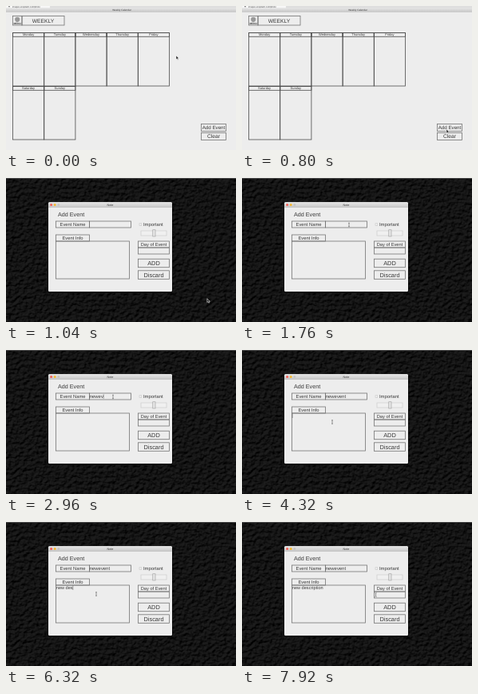
An HTML page that plays this animation: 288 px wide and 180 px high, repeating every 8000 ms.

```html
<!DOCTYPE html>
<html lang="en">
<head>
<meta charset="utf-8">
<title>Weekly planner</title>
<style>
  html, body { margin: 0; width: 100%; height: 100%; overflow: hidden; background: #111; }
  svg { display: block; width: 100vw; height: 100vh; }
  text { font-family: "Liberation Sans", Arial, sans-serif; fill: #383838; text-rendering: geometricPrecision; }
  .box { fill: none; stroke: #747474; stroke-width: .8; }
  .grid { fill: none; stroke: #4c4c4c; stroke-width: .8; }
  .faint { fill: #f0f0f0; stroke: #c6c6c6; stroke-width: .6; }
</style>
</head>
<body>
<svg id="stage" viewBox="0 0 288 180" preserveAspectRatio="none">
  <defs>
    <filter id="leather" x="0" y="0" width="100%" height="100%" color-interpolation-filters="sRGB">
      <feTurbulence type="fractalNoise" baseFrequency=".2 .24" numOctaves="3" seed="8"/>
      <feDiffuseLighting surfaceScale="3.2" lighting-color="#1d1d1d">
        <feDistantLight azimuth="235" elevation="48"/>
      </feDiffuseLighting>
    </filter>
    <linearGradient id="bar" x2="0" y2="1">
      <stop stop-color="#e6e6e6"/><stop offset="1" stop-color="#c8c8c8"/>
    </linearGradient>
    <linearGradient id="shade" x2="1" y2="1">
      <stop stop-color="#000" stop-opacity=".45"/><stop offset="1" stop-color="#000" stop-opacity="0"/>
    </linearGradient>
  </defs>
  <g id="calendar"></g>
  <g id="browser"></g>
  <g id="form"></g>
  <g id="pointer">
    <path id="arrow" d="M0 0V4.8L1.2 3.8 2 5.5 2.9 5.1 2.1 3.5H3.6Z" fill="#222" stroke="#fff" stroke-width=".5"/>
    <path id="beam" d="M-1-2.4Q0-2.4 0-1.7Q0-2.4 1-2.4M0-1.7V1.7M-1 2.4Q0 2.4 0 1.7Q0 2.4 1 2.4" fill="none" stroke="#555" stroke-width=".6"/>
  </g>
</svg>
<script>
const LOOP = 8000;
const OPEN = 880, FILLED = 960;
const $ = id => document.getElementById(id);

const rect = (x, y, w, h, attrs = 'class="box"') =>
  `<rect x="${x}" y="${y}" width="${w}" height="${h}" ${attrs}/>`;
const label = (x, y, size, text, anchor = 'middle', attrs = '') =>
  `<text x="${x}" y="${y}" font-size="${size}" text-anchor="${anchor}" ${attrs}>${text}</text>`;
const button = (x, y, w, h, size, text) =>
  rect(x, y, w, h) + label(x + w / 2, y + h / 2 + size * .36, size, text);
const dot = (x, y, r, color) => `<circle cx="${x}" cy="${y}" r="${r}" fill="${color}"/>`;
const leather = rect(0, 0, 288, 180, 'filter="url(#leather)"');

function appWindow(x, y, w, h) {
  const lights = ['#f25f57', '#f5b82e', '#c4c4c4']
    .map((color, i) => dot(x + 3.6 + i * 4.6, y + 3.2, 1.5, color)).join('');
  return rect(x - 1, y, w + 2, h + 2, 'rx="2" fill="#000" opacity=".5"') +
    rect(x, y, w, h, 'rx="1.5" fill="#ededed"') +
    rect(x, y, w, 6.3, 'rx="1.5" fill="url(#bar)"') +
    rect(x, y + 6, w, .5, 'fill="#aaa"') +
    lights + label(x + w / 2, y + 4.5, 3.7, 'Note');
}

function dayCell(name, i) {
  const x = 8.5 + (i % 5) * 39.2, y = i < 5 ? 33.5 : 100.5;
  return rect(x, y, 39.2, 66.5, 'class="grid"') +
    rect(x, y, 39.2, 4.8, 'class="grid"') + label(x + 19.6, y + 3.8, 4, name);
}

const days = ['Monday', 'Tuesday', 'Wednesday', 'Thursday', 'Friday', 'Saturday', 'Sunday'];
$('calendar').innerHTML =
  rect(0, 0, 288, 180, 'fill="#ededed"') +
  rect(0, 0, 288, 3, 'fill="#dedede"') +
  rect(0, 0, 55, 2.4, 'fill="#f7f7f7"') +
  label(8, 1.5, 2.8, 'images.unsplash.com/photo', 'start') + dot(4, .6, .9, '#777') +
  rect(0, 2.6, 288, 4.6, 'fill="url(#bar)"') + rect(0, 7, 288, .5, 'fill="#b5b5b5"') +
  label(145, 6.1, 3.1, 'Weekly Calendar') +
  rect(8.5, 12.5, 11.5, 11.5) + dot(14.2, 16.8, 3.1, '#999') +
  label(14.2, 23.3, 3.2, 'MENU', 'middle', 'font-weight="bold"') +
  button(20, 12.5, 53, 11.5, 6.7, 'WEEKLY') +
  days.map(dayCell).join('') +
  button(244.5, 147.5, 31, 9, 6.2, 'Add Event') +
  button(244.5, 158.5, 31, 9, 6.7, 'Clear');

$('browser').innerHTML = leather +
  rect(0, 13, 288, 167, 'fill="url(#shade)"') +
  rect(0, 13, 19, 167, 'fill="#0c0c0c"') + rect(267, 13, 21, 167, 'fill="#0c0c0c"') +
  rect(0, 0, 288, 4, 'fill="#d4d7da"') + rect(0, 0, 56, 4, 'fill="#f8f8f8"') +
  label(8, 2.2, 2.8, 'images.unsplash.com/photo', 'start') +
  rect(0, 3.5, 288, 9.5, 'fill="#f4f4f4"') +
  rect(6, 4.8, 239, 6.8, 'rx="3.4" fill="#fff" stroke="#9db89f" stroke-width=".6"') +
  label(12, 9.2, 3.25, 'images.unsplash.com/photo-1500000000000-000000000000?ixlib=rb-1.2.1&amp;ixid=eyJhcHBfaWQiOjEyMDd9&amp;auto=format&amp;fit=crop&amp;w=1000&amp;q=80', 'start') +
  ['#888', '#57a866', '#d65650', '#999', '#777']
    .map((color, i) => dot(249.5 + i * 7.8, 8.2, 1.5, color)).join('') +
  appWindow(66.5, 39.3, 155.5, 94.7);

$('form').innerHTML = leather +
  rect(0, 0, 288, 1, 'fill="#484848"') +
  appWindow(53, 30.3, 155, 111.7) +
  label(65, 47.8, 7.2, 'Add Event', 'start') +
  button(62.5, 54, 42, 8, 5.8, 'Event Name') + rect(104.5, 54, 52, 8) +
  button(62.5, 71, 42, 8, 5.8, 'Event Info') + rect(62.5, 79, 92, 47) +
  rect(167, 56.8, 2.8, 2.8, 'class="faint"') + label(172, 60.2, 5.8, 'Important', 'start') +
  rect(169, 66, 32, 6, 'class="faint"') +
  rect(183.8, 64.8, 3.2, 8.2, 'fill="#e6e6e6" stroke="#999" stroke-width=".6"') +
  button(165.5, 79, 39, 8, 5.7, 'Day of Event') + rect(165.5, 87, 39, 8) +
  button(165.5, 101.2, 39, 10.5, 7.4, 'ADD') +
  button(165.5, 115.8, 39, 10.5, 7.4, 'Discard') +
  label(104.8, 59.8, 5.9, '', 'start', 'id="nameText"') +
  label(62.8, 83.8, 5.6, '', 'start', 'id="infoText"') +
  rect(0, 0, .5, 5.4, 'id="caret" fill="#444"');

const typing = [
  { id: 'nameText', text: 'newevent', x: 104.8, y: 55.4, from: 1840, to: 4080,
    keys: [2240, 2400, 2640, 2800, 2960, 3200, 3360, 3520] },
  { id: 'infoText', text: 'new description', x: 62.8, y: 79.6, from: 4080, to: 7840,
    keys: [4400, 4640, 4960, 5200, 5520, 6080, 6240, 6560, 6800, 6960, 7040, 7120, 7200, 7280, 7360] }
];

// Pointer stops: time, x, y
const path = [
  [0, 213, 62], [80, 213, 62], [720, 256, 154], [FILLED, 256, 154],
  [1680, 134, 58.5], [3600, 134, 58.5], [4080, 113, 90],
  [7440, 113, 90], [7840, 167.5, 91], [LOOP, 167.5, 91]
];

function pointerAt(t) {
  const i = path.findIndex(stop => stop[0] > t);
  const a = path[i - 1], b = path[i];
  const p = (t - a[0]) / (b[0] - a[0]);
  const eased = p * p * (3 - 2 * p);
  return [a[1] + (b[1] - a[1]) * eased, a[2] + (b[2] - a[2]) * eased];
}

const show = (id, on) => { $(id).style.display = on ? '' : 'none'; };

function render(t) {
  show('calendar', t < OPEN);
  show('browser', t >= OPEN && t < FILLED);
  show('form', t >= FILLED);
  let caretOn = false;
  for (const field of typing) {
    const el = $(field.id);
    const typed = field.text.slice(0, field.keys.filter(k => k <= t).length);
    if (el.textContent !== typed) el.textContent = typed;
    if (t >= field.from && t < field.to) {
      caretOn = true;
      // A trailing space has no advance of its own in SVG text.
      const space = typed.endsWith(' ') ? 1.6 : 0;
      const width = typed ? el.getComputedTextLength() : 0;
      $('caret').setAttribute('x', field.x + width + space);
      $('caret').setAttribute('y', field.y);
    }
  }
  show('caret', caretOn);
  const [x, y] = pointerAt(t);
  const overField = t > 1600;
  show('arrow', !overField);
  show('beam', overField);
  $('pointer').setAttribute('transform', `translate(${x} ${y})`);
}

let start;
function tick(now) {
  start ??= now;
  render(Math.floor((now - start) % LOOP / 80 + .01) * 80);
  requestAnimationFrame(tick);
}
render(0);
requestAnimationFrame(tick);
</script>
</body>
</html>
```
